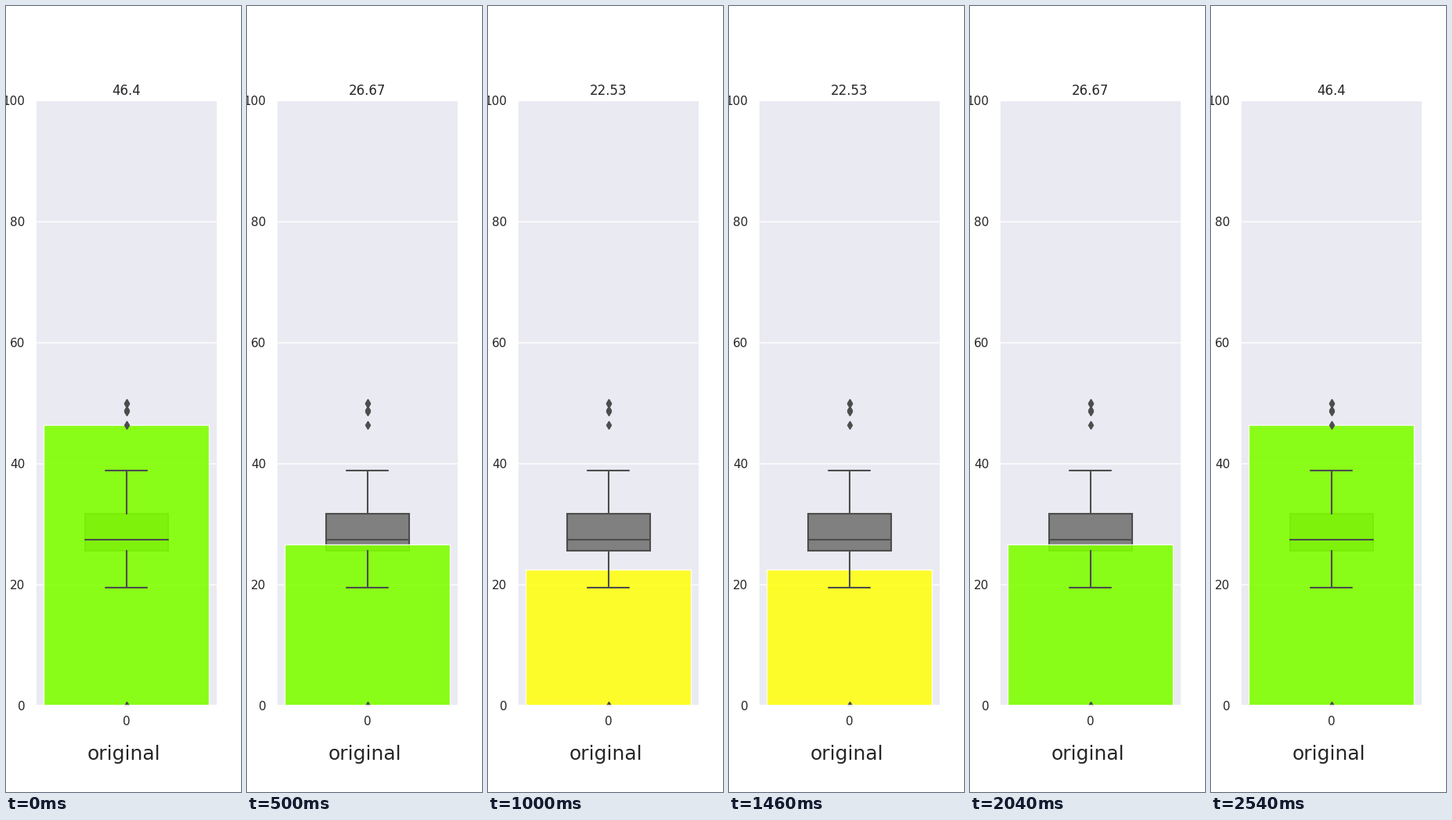
A matplotlib script that plays this animation: 300x1000 px, repeating every 2560 ms.

```python
import matplotlib.pyplot as plt
import numpy as np
from matplotlib.animation import FuncAnimation
from matplotlib.patches import Rectangle

TICK_MS = 20
STEPS = 32
INK = "0.15"
SHADE = "#4d4d4d"
FAST, SLOW = "chartreuse", "xkcd:yellow"

plt.rcParams.update({
    "font.family": "DejaVu Sans",
    "text.color": INK,
    "xtick.color": INK,
    "ytick.color": INK,
    "axes.facecolor": "#eaeaf2",
    "axes.edgecolor": "white",
    "axes.linewidth": 1.25,
    "axes.axisbelow": True,
    "grid.color": "white",
    "grid.linewidth": 1,
    "lines.solid_capstyle": "round",
})

Q1, MEDIAN, Q3 = 25.62, 27.45, 31.72
LOW, HIGH = 19.5, 38.86
OUTLIERS = [50, 49.9, 48.8, 48.6, 46.4, 0]


def rate_at(step):
    """Falling trend with a growing bump between long steps."""
    trend = np.interp(step, [0, 1, 6, 13, 18, 26, 31],
                      [46.4, HIGH, 30.67, 26.67, 25.64, 22.53, 21])
    since_long = (step - 2) % 4
    bump = 0.1 * step * np.sin(np.pi * since_long / 3)
    return round(float(trend + bump), 2)


def build_timeline():
    """Every fourth step lasts five ticks; play forward, then backward."""
    ticks = []
    for step in range(STEPS):
        ticks += [rate_at(step)] * (5 if step % 4 == 2 else 1)
    return ticks + ticks[::-1]


def stroke(xs, ys):
    ax.plot(xs, ys, color=SHADE, lw=1.5, zorder=2.1)


timeline = build_timeline()

fig = plt.figure(figsize=(3, 10), dpi=100, facecolor="white")
ax = fig.add_axes([0.125, 0.11, 0.775, 0.77])

ax.add_patch(Rectangle((-0.2, Q1), 0.4, Q3 - Q1, facecolor="#808080",
                       edgecolor=SHADE, lw=1.5, zorder=0.9))
for near, far in [(Q1, LOW), (Q3, HIGH)]:
    stroke([0, 0], [near, far])
    stroke([-0.1, 0.1], [far, far])
stroke([-0.2, 0.2], [MEDIAN, MEDIAN])
ax.plot([0] * len(OUTLIERS), OUTLIERS, "d", color=SHADE, ms=5, mew=1,
        zorder=2.2)

bar = ax.bar(0, 0, width=0.8, edgecolor="white", lw=1, alpha=0.9)[0]

ax.set_xlim(-0.44, 0.44)
ax.set_ylim(0, 100)
ax.set_xticks([0])
ax.set_yticks(range(0, 101, 20))
ax.tick_params(length=6, pad=3.5, labelsize=11, bottom=False, left=False)
ax.grid(axis="y")
fig.suptitle("original", y=0.06, fontsize=18)
title = ax.set_title("", fontsize=12, pad=5.3)


def update(tick):
    rate = timeline[tick]
    bar.set_height(rate)
    bar.set_facecolor(FAST if rate > 26.5 else SLOW)
    title.set_text(str(rate))
    return bar, title


animation = FuncAnimation(fig, update, frames=len(timeline),
                          interval=TICK_MS, repeat=True, repeat_delay=0)
plt.show()
```
